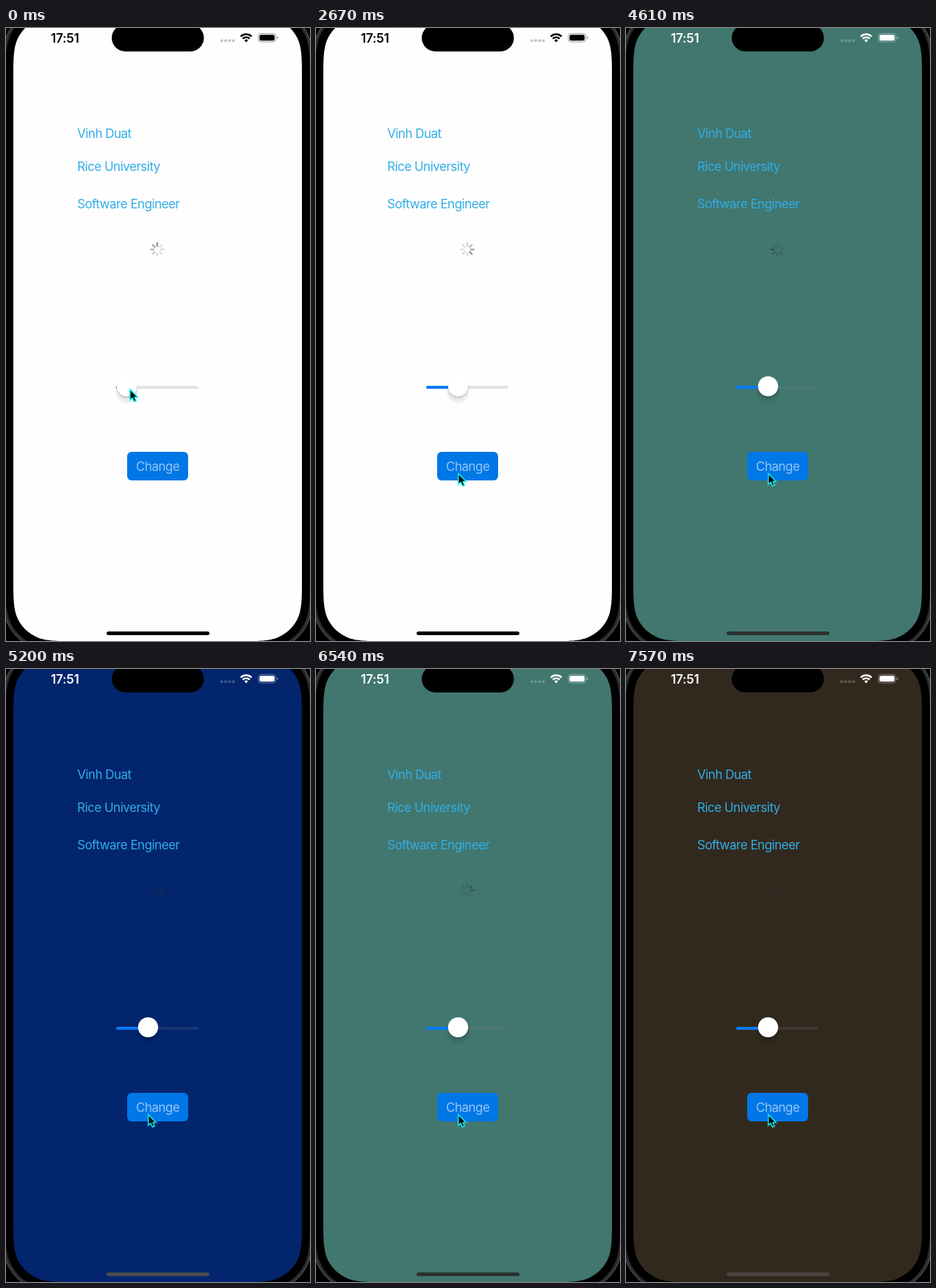
Recreate the animation shown at these times as an HTML page. Size 414 px wide and 836 px high, loop 8000 ms.

```html
<!DOCTYPE html>
<html lang="en">
<head>
<meta charset="utf-8">
<title>Colour changer</title>
<style>
  html, body { margin: 0; width: 100%; height: 100%; overflow: hidden; background: #000; }
  svg { display: block; width: 414px; height: 836px; }
  text { font-family: Inter, "Open Sans", sans-serif; font-size: 17px; letter-spacing: -.5px; }
  .label { fill: #32ade6; }
  .time { font-weight: 600; letter-spacing: -.2px; }
</style>
</head>
<body>
<svg viewBox="0 0 414 836">
  <defs>
    <filter id="soft" x="-50%" y="-50%" width="200%" height="200%"><feGaussianBlur stdDeviation="1.6"/></filter>
  </defs>
  <path id="edge" fill="#2b2b2b" stroke="#686868"/>
  <path id="bezel" fill="#000"/>
  <path id="screen"/>
  <rect x="144" y="-5" width="125.5" height="37" rx="18.5"/>

  <g id="status">
    <text class="time" x="61" y="19.5">17:51</text>
    <g id="dots" opacity=".22"></g>
    <g fill="none" stroke="currentColor" stroke-width="2.3">
      <path d="M319.7 11.6a10.4 10.4 0 0 1 14.8 0"/>
      <path d="M322.4 14.6a6.6 6.6 0 0 1 9.4 0"/>
    </g>
    <path d="M327.1 19.4l-2.5-2.6a3.6 3.6 0 0 1 5 0z"/>
    <rect x="343.5" y="7.5" width="24" height="11.5" rx="3.6" fill="none" stroke="currentColor" opacity=".38"/>
    <rect x="345.2" y="9.2" width="20.6" height="8.1" rx="2.2"/>
    <path d="M369 11.3q1.5 .6 1.5 2t-1.5 2z" opacity=".45"/>
  </g>

  <text class="label" x="97" y="150">Vinh Duat</text>
  <text class="label" x="97" y="195">Rice University</text>
  <text class="label" x="97" y="246">Software Engineer</text>

  <g id="spinner" transform="translate(206 302)" stroke="#323234" stroke-width="2.4" stroke-linecap="round"></g>

  <rect x="150" y="488" width="112" height="4" rx="2" fill="#787880" fill-opacity=".2"/>
  <rect id="fill" x="150" y="488" height="4" rx="2" fill="#087aff"/>
  <g id="thumb">
    <circle cy="496" r="15" opacity=".07" filter="url(#soft)"/>
    <circle cy="491" r="13.5" opacity=".16" filter="url(#soft)"/>
    <circle cy="488.6" r="13.7" fill="#fff"/>
  </g>

  <rect x="165" y="578" width="83" height="39" rx="6" fill="#0077e6"/>
  <text x="177" y="603.7" fill="#94c5f5">Change</text>

  <rect id="home" x="137" y="823" width="140" height="5" rx="2.5"/>

  <g id="cursor">
    <path id="glow" fill="none" stroke="#0ee" stroke-width="3" opacity=".35"/>
    <path id="arrow" stroke="#19efef" stroke-width="1.2" stroke-linejoin="round"/>
  </g>
</svg>
<script>
const LOOP = 8000, STEP = 148.1, SPOKE = 98.2;
const $ = id => document.getElementById(id);
const set = (el, attrs) => { for (const k in attrs) el.setAttribute(k, attrs[k]); };
const add = (parent, tag, attrs) => {
  const el = document.createElementNS('http://www.w3.org/2000/svg', tag);
  set(el, attrs);
  return parent.appendChild(el);
};

// Start time, background, status bar colour, home indicator colour
const scenes = [
  [0, '#fefefe', '#000', '#000'],
  [3710, '#6c3b78', '#fff', '#41334a'],
  [4310, '#41776f', '#fff', '#2b302f'],
  [5200, '#03256d', '#fff', '#4b494d'],
  [5790, '#6c3b78', '#fff', '#41334a'],
  [6090, '#466532', '#fff', '#393b36'],
  [6540, '#41776f', '#fff', '#2b302f'],
  [6980, '#03256d', '#fff', '#4b494d'],
  [7570, '#32291e', '#fff', '#4b4641']
];

// Keyed values: time, value; eased between keys
const thumbX = [[0, 164.5], [1190, 248], [1400, 248], [2230, 193.5]];
const cursorX = [[0, 169], [1190, 257], [1400, 257], [2230, 198], [2400, 198], [2640, 194]];
const cursorY = [[0, 493], [1190, 497], [2230, 503], [2400, 503], [2640, 608]];

function at(keys, t) {
  const i = keys.findIndex(k => k[0] > t);
  if (i < 0) return keys[keys.length - 1][1];
  const [t0, a] = keys[i - 1], [t1, b] = keys[i];
  const u = (t - t0) / (t1 - t0);
  return a + (b - a) * u * u * (3 - 2 * u);
}

// Rounded rectangle with continuous corners, grown by g around the display
function shell(g) {
  const x0 = 10 - g, y0 = -16 - g, x1 = 403 + g, y1 = 836 + g, r = 55 + g;
  const curve = [[0, 1.529], [0, 1.088], [0, .868], [.075, .631], [.169, .373], [.373, .169],
    [.631, .075], [.868, 0], [1.088, 0], [1.529, 0]];
  const corner = (x, y, sx, sy, flip) => {
    const p = (flip ? [...curve].reverse() : curve)
      .map(([u, v]) => `${x + sx * u * r} ${y + sy * v * r}`);
    return `${p[0]}C${p.slice(1).join(' ')}`;
  };
  return 'M' + [corner(x0, y0, 1, 1), corner(x1, y0, -1, 1, true),
    corner(x1, y1, -1, -1), corner(x0, y1, 1, -1, true)].join('L') + 'Z';
}

set($('edge'), { d: shell(15) });
set($('bezel'), { d: shell(11) });
set($('screen'), { d: shell(0) });
for (const id of ['glow', 'arrow'])
  set($(id), { d: 'M0 0V14L3.2 11.2L5.6 16.4L8 15.4L5.8 10.3H10Z' });
for (let i = 0; i < 4; i++) add($('dots'), 'circle', { cx: 293.8 + 5.3 * i, cy: 17.3, r: 2 });

const spokes = Array.from({ length: 8 }, (_, i) =>
  add($('spinner'), 'line', { y1: -4.8, y2: -8.8, transform: `rotate(${45 * i})` }));

function draw(now) {
  const real = now % LOOP;
  const t = Math.floor(real / STEP) * STEP;
  const [, bg, ink, bar] = scenes.filter(s => s[0] <= real).pop();
  set($('screen'), { fill: bg });
  set($('status'), { fill: ink, color: ink });
  set($('home'), { fill: bar });

  const head = Math.floor(t / SPOKE);
  spokes.forEach((s, i) => {
    const age = ((head - i) % 8 + 8) % 8;
    set(s, { opacity: Math.max(.16, .5 - .09 * age) });
  });

  const x = at(thumbX, t);
  set($('thumb'), { transform: `translate(${x} 0)` });
  set($('fill'), { width: x - 150 });
  set($('cursor'), { transform: `translate(${at(cursorX, t)} ${at(cursorY, t)})` });
}

const start = performance.now();
function tick() {
  draw(performance.now() - start);
  requestAnimationFrame(tick);
}
tick();
</script>
</body>
</html>
```
